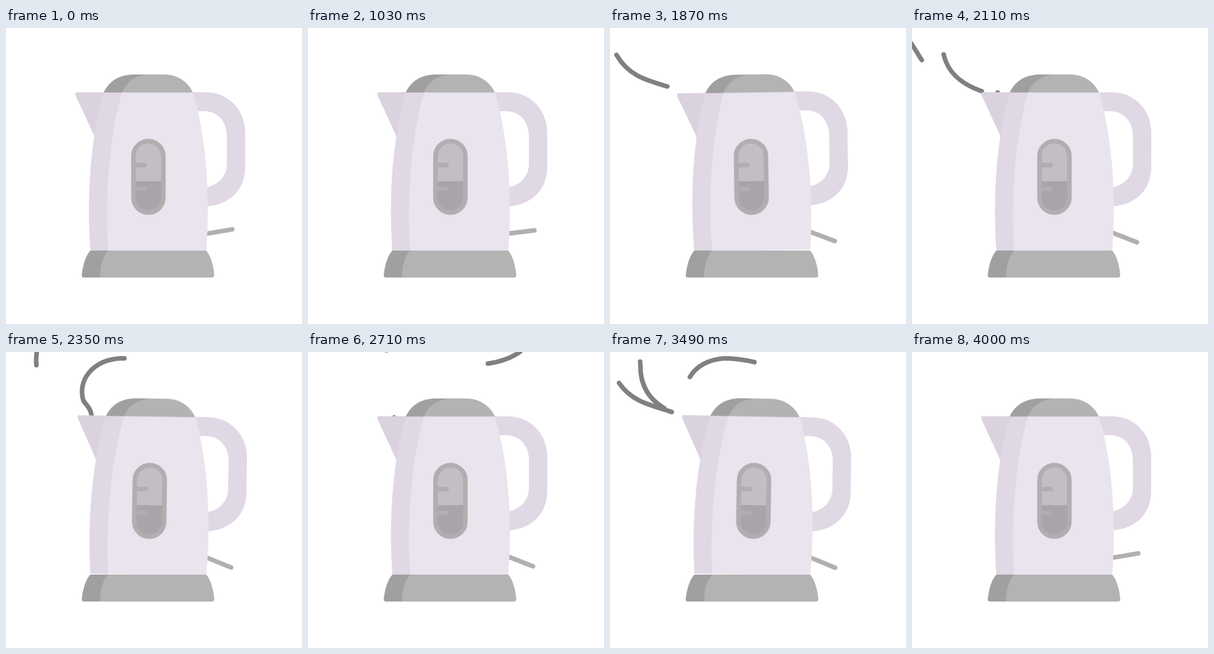
These frames come from a looping animation (516x516 px, 4.66 s). An HTML page:

```html
<!DOCTYPE html>
<html lang="en">
<head>
<meta charset="utf-8">
<title>Boiling kettle</title>
<style>
  html, body { margin: 0; width: 100%; height: 100%; overflow: hidden; background: #fff; }
  svg { display: block; width: 100%; height: 100%; }

  .light { fill: #b3b3b3; }
  .dark { fill: #a0a0a0; }
  .front { fill: #e9e4ed; }
  .side { fill: #e0d8e5; }
  .spout { fill: #dbd2e0; }
  .line { fill: none; stroke: #b0aeb0; stroke-width: 8; stroke-linecap: round; }

  .kettle {
    transform-origin: 247px 388px;
    animation: rock 4660ms cubic-bezier(.8, 0, .2, 1) infinite;
  }
  .lever {
    stroke: #b0b0b0;
    transform-origin: 352.5px 358px;
    animation: press 4660ms ease-in-out infinite;
  }
  .steam path {
    fill: none;
    stroke: #808080;
    stroke-width: 8;
    stroke-linecap: round;
    stroke-dasharray: var(--len) 400;
    animation: flow 4660ms linear var(--at) infinite both;
  }

  @keyframes rock {
    0%, 33.05% { transform: rotate(0deg); }
    35.62%, 48.5%, 61.37%, 74.25% { transform: rotate(1deg); }
    42.06%, 54.94%, 67.81% { transform: rotate(-1deg); }
    78.11%, 100% { transform: rotate(0deg); }
  }
  @keyframes press {
    0%, 21.46% { transform: rotate(-9.5deg); }
    25.32% { transform: rotate(31deg); }
    28.54%, 79.4% { transform: rotate(21.3deg); }
    82.3% { transform: rotate(31deg); }
    85.84%, 100% { transform: rotate(-9.5deg); }
  }
  /* A dash of length --len slides along the whole path. */
  @keyframes flow {
    0% { stroke-dashoffset: var(--len); visibility: visible; }
    16.74% { stroke-dashoffset: -100; visibility: visible; }
    16.75%, 100% { stroke-dashoffset: -100; visibility: hidden; }
  }
</style>
</head>
<body>
<svg viewBox="0 0 516 516">
  <defs>
    <path id="left" pathLength="100" d="M140 116L100 102C60 90 32 82 12 48S-8 18 -30 10"/>
    <path id="up" pathLength="100" d="M140 116C100 105 52 85 53 23C51 5 56 -10 70 -130"/>
    <clipPath id="glass"><rect x="222" y="197.500" width="52" height="124" rx="26"/></clipPath>
  </defs>

  <g class="steam">
    <path pathLength="100" style="--len:51.7;--at:1500ms" d="M140 116L100 102C60 90 32 82 12 48S-8 18 -30 10"/>
    <path pathLength="100" style="--len:33;--at:1879ms" d="M140 116C100 105 52 85 53 23C51 5 56 -10 70 -130"/>
    <path pathLength="100" style="--len:32.3;--at:2093ms" d="M150 124C150 104 146 98 135 85C124 50 150 14 200 11C240 11 270 25 307 21C335 18 355 10 369 0L400 -30"/>
    <path pathLength="100" style="--len:29.4;--at:2267ms" d="M150 124C150 104 146 98 137 88C126 60 140 30 137 0C136 -20 130 -60 120 -168"/>
    <path pathLength="100" style="--len:35;--at:2688ms" d="M145 125C170 80 165 18 133 4C120 -1 105 -8 80 -60L60 -140"/>
    <path pathLength="100" style="--len:51.7;--at:3140ms" d="M140 116L100 102C60 90 32 82 12 48S-8 18 -30 10"/>
    <path pathLength="100" style="--len:33;--at:3200ms" d="M140 116C100 105 52 85 53 23C51 5 56 -10 70 -130"/>
    <path pathLength="100" style="--len:27;--at:3210ms" d="M150 124C150 104 146 98 135 85C124 50 150 14 200 11C260 11 300 40 360 38C420 36 455 25 473 0L478 -14"/>
  </g>

  <g class="kettle">
    <path class="line lever" d="M350 358H395"/>
    <path class="side" d="M322 112H348C390 112 417 145 417 182V243C417 285 385 311 345 311V278C372 276 385 255 385 238V188C385 162 368 145 345 145H325Z"/>
    <path class="spout" d="M123 112H175L165 190H155Q153 188 152 184L121 117Q120 112 123 112Z"/>
    <path class="dark" d="M170 113C178 96 192 82 222 81H250V113Z"/>
    <path class="light" d="M202 113C208 96 224 83 247 81H276C300 81 318 95 326 113Z"/>
    <path class="side" d="M147 388C140 290 148 190 170 112.500H210V388Z"/>
    <path class="front" d="M178 388C172 290 180 190 202 112.500H326C348 185 357 290 349 388Z"/>

    <g clip-path="url(#glass)">
      <path fill="#c3bec6" d="M218 193H278V267H218Z"/>
      <path fill="#aaa3aa" d="M218 267H278V326H218Z"/>
    </g>
    <path class="line" d="M224 239H241.500M224 280.500H241.500"/>
    <rect class="line" x="222.250" y="197.250" width="52" height="124.500" rx="26"/>
  </g>

  <path class="dark" d="M147 388H180V435H136Q132 435 132 431C134 412 139 397 147 388Z"/>
  <path class="light" d="M178 388H349C357 397 362 415 363 431Q363 435 359 435H164C164 415 168 399 178 388Z"/>
</svg>
</body>
</html>
```
